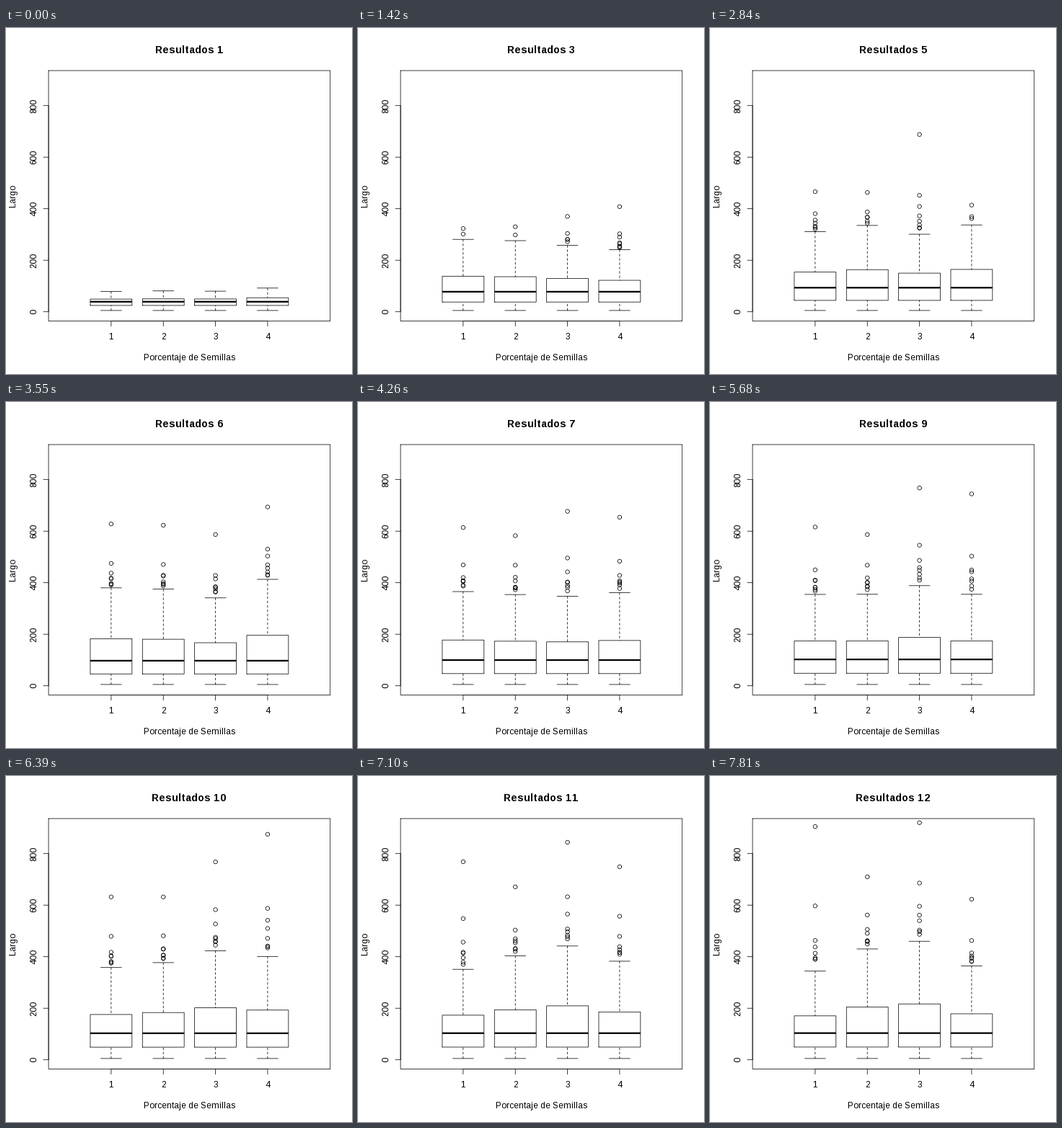
Recreate the animation shown at these times as a matplotlib script. Size 480 by 480 pixels, loop 8000 ms.

```python
import numpy as np
import matplotlib.pyplot as plt
from matplotlib.animation import FuncAnimation
from matplotlib.collections import LineCollection

SIZE, LOOP, STEP, HOLD = 480, 8000, 20, 710
LINE, STROKE = 14.4, 0.75                     # margin line and pen, in pixels
LEFT, TOP = 4.1 * LINE, 4.1 * LINE
RIGHT, BOTTOM = SIZE - 2.1 * LINE, SIZE - 5.1 * LINE
MID_X, MID_Y = (LEFT + RIGHT) / 2, (TOP + BOTTOM) / 2
GROUPS, VALUES = range(1, 5), range(0, 801, 200)

# Key points per group: upper whisker and largest value at these runs
KEYS = [1, 3, 5, 6, 8, 10, 12]
WHISKER = [[79, 281, 311, 380, 351, 358, 344],
           [81, 276, 335, 375, 333, 377, 430],
           [80, 258, 301, 341, 354, 423, 460],
           [92, 241, 337, 413, 309, 401, 364]]
LARGEST = [[79, 323, 466, 628, 600, 632, 905],
           [81, 330, 463, 623, 542, 632, 710],
           [80, 370, 688, 587, 767, 768, 920],
           [92, 408, 414, 694, 614, 875, 623]]

plt.rcParams.update({"font.family": "Liberation Sans", "font.size": 12,
                     "text.hinting": "force_autohint",
                     "text.hinting_factor": 1, "toolbar": "None"})


def px(x):
    return LEFT + (x + 0.2) / 5.4 * (RIGHT - LEFT)


def py(v):
    return BOTTOM - (v + 36) / 972 * (BOTTOM - TOP)


def sample(n, g):
    """Five box statistics and the outliers of group g in run n."""
    high = np.interp(n, KEYS, WHISKER[g - 1])
    top = np.interp(n, KEYS, LARGEST[g - 1])
    q1 = 50 - 25.5 * np.exp((1 - n) / 2.7)
    median = 104 - 65 * np.exp((1 - n) / 2.2)
    q3 = (high + 1.5 * q1) / 2.5 + 3          # whisker reaches 1.5 box heights
    rank = np.arange(1, 1 + min(8, int((top - high) / 20)))
    decay = np.random.default_rng(10 * n + g).uniform(1, 1.5, rank.size)
    return (5, q1, median, q3, high), high + (top - high) * rank ** -decay


fig = plt.figure(figsize=(SIZE / 72, SIZE / 72), dpi=72, facecolor="white")
ax = fig.add_axes([0, 0, 1, 1])
ax.set(xlim=(0, SIZE), ylim=(SIZE, 0))
ax.axis("off")


def strokes(segments=(), width=STROKE, cap="round", style="solid"):
    lines = LineCollection(segments, colors="black", linewidths=width,
                           linestyles=style, capstyle=cap, joinstyle="round",
                           snap=False)
    ax.add_collection(lines, autolim=False)
    return lines


def label(x, y, text, rotation=0, **font):
    # Whole-pixel baselines keep the glyphs level
    x, y = (round(x), y) if rotation else (x, round(y))
    return ax.text(x, y, text, rotation=rotation, ha="center", va="baseline",
                   rotation_mode="anchor", **font)


def rect(x0, y0, x1, y1):
    return [(x0, y0), (x1, y0), (x1, y1), (x0, y1), (x0, y0)]


medians = strokes(width=3 * STROKE, cap="butt")
whiskers = strokes(style=(0, (4, 4)))
solids = strokes()
dots = strokes()

# Frame, axes and ticks
tick = LINE / 2
strokes([rect(LEFT, TOP, RIGHT, BOTTOM),
         [(px(1), BOTTOM), (px(4), BOTTOM)],
         [(LEFT, py(0)), (LEFT, py(800))]]
        + [[(px(g), BOTTOM), (px(g), BOTTOM + tick)] for g in GROUPS]
        + [[(LEFT, py(v)), (LEFT - tick, py(v))] for v in VALUES])

for g in GROUPS:
    label(px(g), BOTTOM + 1.8 * LINE, str(g))
for v in VALUES:
    label(LEFT - 1.2 * LINE, py(v), str(v), 90)
label(MID_X, BOTTOM + 3.8 * LINE, "Porcentaje de Semillas")
label(LEFT - 3.2 * LINE, MID_Y, "Largo", 90)
title = label(MID_X, 34.8, "", fontsize=14.4, fontweight="bold")

turn = np.linspace(0, 2 * np.pi, 33)
ring = 2.7 * np.column_stack([np.cos(turn), np.sin(turn)])


def show(n):
    dashed, solid, thick, rings = [], [], [], []
    for g in GROUPS:
        stats, outliers = sample(n, g)
        low, q1, med, q3, high = (py(v) for v in stats)
        x, x0, x1 = px(g), px(g - 0.4), px(g + 0.4)
        dashed += [[(x, low), (x, q1)], [(x, high), (x, q3)]]
        solid += [[(px(g - 0.2), y), (px(g + 0.2), y)] for y in (low, high)]
        solid.append(rect(x0, q1, x1, q3))
        thick.append([(x0, med), (x1, med)])
        rings += [ring + (x, py(v)) for v in outliers]
    whiskers.set_segments(dashed)
    solids.set_segments(solid)
    medians.set_segments(thick)
    dots.set_segments(rings)
    title.set_text(f"Resultados {n}")


def update(i):
    show(1 + (i * STEP + STEP // 2) // HOLD)
    return whiskers, solids, medians, dots, title


anim = FuncAnimation(fig, update, frames=LOOP // STEP, interval=STEP,
                     repeat=True, repeat_delay=0)
plt.show()
```
